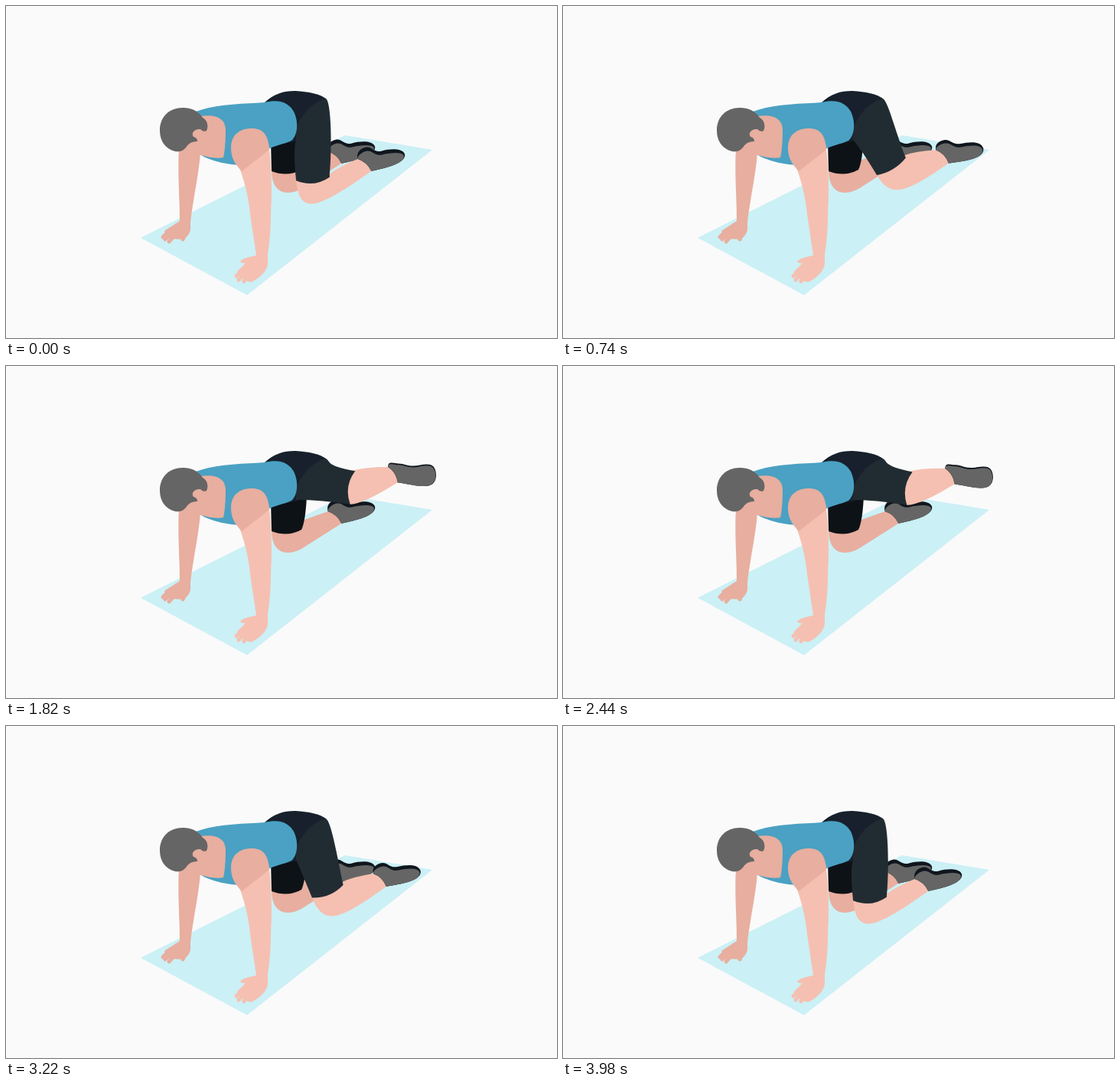
An HTML page for the animation above (4000 ms loop, 720 px wide and 434 px high).

```html
<!DOCTYPE html>
<html lang="en">
<head>
<meta charset="utf-8">
<title>Kneeling leg raise</title>
<style>
html, body { margin: 0; width: 100%; height: 100%; overflow: hidden; background: #fafafa; }
svg { display: block; width: 720px; height: 434px; }
.skin { fill: #f5c0b1; }
.shade { fill: #e8ae9f; }
.shirt { fill: #4aa1c3; }
.grey { fill: #656565; }
.sole { fill: #10161d; }
.fingers { fill: none; stroke-width: 5; stroke-linecap: round; }
</style>
</head>
<body>
<svg viewBox="0 0 720 434">
  <path fill="#cbf0f6" d="M176 303L315 378L557 188L443 169Z"/>

  <!-- far arm -->
  <path class="shade" d="M226 184C224 220 227 250 227 281L207 294L212 304L230 305Q238 303 241 293L241 283C244 255 252 220 254 192Z"/>
  <path class="fingers" stroke="#e8ae9f" d="M214 293L205 302M217 297L208 305M222 298L213 308M236 294L231 305"/>

  <!-- resting leg -->
  <path class="shade" d="M347 214C347 236 357 244 368 244C378 244 385 240 394 234L438 206L435 192L421 190L387 202Z"/>
  <g id="restingFoot"><path class="sole"/><path class="grey"/></g>
  <path fill="#0d1217" d="M346 176L393 170C392 190 390 206 386 214Q368 224 347 216Z"/>

  <path fill="#17202c" d="M338 126C350 115 362 111 378 111C396 112 410 115 418 121L400 150L381 176L345 184Z"/>

  <!-- moving leg -->
  <path id="calf" class="skin"/>
  <g id="foot"><path class="sole"/><path class="grey"/></g>
  <path id="thigh" fill="#212c32"/>

  <!-- torso and head -->
  <path class="shirt" d="M248 138C275 128 310 128 338 126C358 121 371 127 377 140C383 155 380 170 373 176C362 181 352 182 343 187L308 208C295 208 270 204 255 195Z"/>
  <path class="shade" d="M245 146C272 139 287 146 287 162C287 176 286 190 284 198C275 200 262 197 255 195L226 190L238 178Z"/>
  <path class="grey" d="M201 163C201 144 214 133 231 133C243 133 252 138 257 146C263 149 265 157 262 163C259 165 256 163 254 161C247 160 241 166 245 171Q250 172 250 177C241 177 238 181 235 185C231 190 226 191 221 190C208 187 201 176 201 163Z"/>

  <!-- near arm -->
  <path class="skin" d="M300 198C312 228 317 250 319 272L327 326C318 328 309 330 306 334Q308 337 313 336L302 347L310 358L320 361C330 357 341 347 342 337L342 325C345 305 346 290 346 270C348 240 347 205 343 180Z"/>
  <path class="fingers" stroke="#f5c0b1" d="M308 346L301 353M311 350L304 358M317 352L311 360"/>
  <path class="shade" d="M294 185C294 168 306 160 321 160C337 160 343 170 344 188L308 216C300 207 294 200 294 185Z"/>
</svg>
<script>
const LOOP = 4000, PEAK = 1915;
const HIP = [393, 150], HEM = 22;

// Time from the peak, then knee x y, ankle x y, foot angle.
const keys = [
  [0, 453, 159, 505, 142, 1],
  [520, 453, 160, 505, 144, 2],
  [655, 452, 174, 506, 157, -2],
  [1175, 429, 210, 495, 197, -11],
  [1650, 401, 226, 468, 208, -15],
  [LOOP, 401, 226, 468, 208, -15]
];

const add = (p, q, k = 1) => [p[0] + q[0] * k, p[1] + q[1] * k];
const mix = (p, q, k) => [p[0] + (q[0] - p[0]) * k, p[1] + (q[1] - p[1]) * k];
const turn = ([x, y], deg) => {
  const a = deg * Math.PI / 180, c = Math.cos(a), s = Math.sin(a);
  return [x * c - y * s, x * s + y * c];
};
// Joins commands and points into path data.
const path = (...parts) =>
  parts.map(p => p.map ? p.map(v => v.toFixed(2)).join(' ') : p).join(' ');
const get = id => document.getElementById(id);

// Slope at key k that never overshoots.
function slope(k, i) {
  if (k < 1 || k > keys.length - 2) return 0;
  const rate = n => (keys[n + 1][i] - keys[n][i]) / (keys[n + 1][0] - keys[n][0]);
  const a = rate(k - 1), b = rate(k);
  return a * b > 0 ? 2 * a * b / (a + b) : 0;
}

function poseAt(t) {
  const k = keys.findIndex(key => key[0] > t) - 1;
  const from = keys[k], to = keys[k + 1];
  const d = to[0] - from[0], u = (t - from[0]) / d;
  return from.map((v, i) => v + (to[i] - v) * u * u * (3 - 2 * u)
    + d * u * (1 - u) * ((1 - u) * slope(k, i) - u * slope(k + 1, i)));
}

// Foot outline around the ankle; it flattens as the leg rises.
function footPath(raise, inset) {
  const heel = -22 + 7 * raise + inset, arch = -12 + inset;
  const toe = 55 + 2 * raise - inset / 3;
  return path('M', [-6, -10],
    'C', [-6, -18 + inset], [0, heel], [7, heel],
    'C', [16, heel], [16, arch], [27, arch],
    'C', [38, arch], [toe - 1, -9 - 13 * raise + inset], [toe, inset / 4],
    'C', [toe - 1, 12 + 8 * raise], [26 + 10 * raise, 11 + 3 * raise], [7, 10],
    'Q', [5, -3], [-6, -10], 'Z');
}

function drawFoot(id, [x, y], angle, raise) {
  const group = get(id), [sole, upper] = group.children;
  group.setAttribute('transform', `translate(${x} ${y}) rotate(${angle})`);
  sole.setAttribute('d', footPath(raise, 0));
  upper.setAttribute('d', footPath(raise, 5 - 3 * raise));
}

function drawLeg([, kx, ky, ax, ay, angle]) {
  const knee = [kx, ky], ankle = [ax, ay];
  const length = Math.hypot(kx - HIP[0], ky - HIP[1]);
  const dir = [(kx - HIP[0]) / length, (ky - HIP[1]) / length];
  const side = [-dir[1], dir[0]], down = dir[1];
  const outer = add(knee, side, -HEM), inner = add(knee, side, HEM);

  get('thigh').setAttribute('d', path('M', [379, 175],
    'C', [376, 150], [398, 126], [418, 121],
    'C', [425, 125], add(add(outer, dir, -40), side, -8 * down), outer,
    'Q', add(knee, dir, 28 * down - 16), inner,
    'Q', add(inner, dir, -40), [379, 175], 'Z'));

  const at = p => add(ankle, turn(p, angle));
  const top = add(outer, dir, -4), front = at([-6, -10]), rear = at([7, 10]);
  const bend = down * down;
  get('calf').setAttribute('d', path('M', top,
    'Q', add(mix(top, front, 0.35), [0, -3]), front,
    'Q', at([9, -4]), rear,
    'C', add(add(mix(rear, inner, 0.77), dir, 34 * bend), [0, 8]), add(inner, dir, 46 * bend), inner,
    'L', add(knee, dir, -25), 'Z'));

  drawFoot('foot', ankle, angle, (208 - ay) / 64);
}

function frame(now) {
  drawLeg(poseAt(Math.abs(now % LOOP - PEAK)));
  requestAnimationFrame(frame);
}
drawFoot('restingFoot', [429, 198], -15, 0);
frame(0);
</script>
</body>
</html>
```
